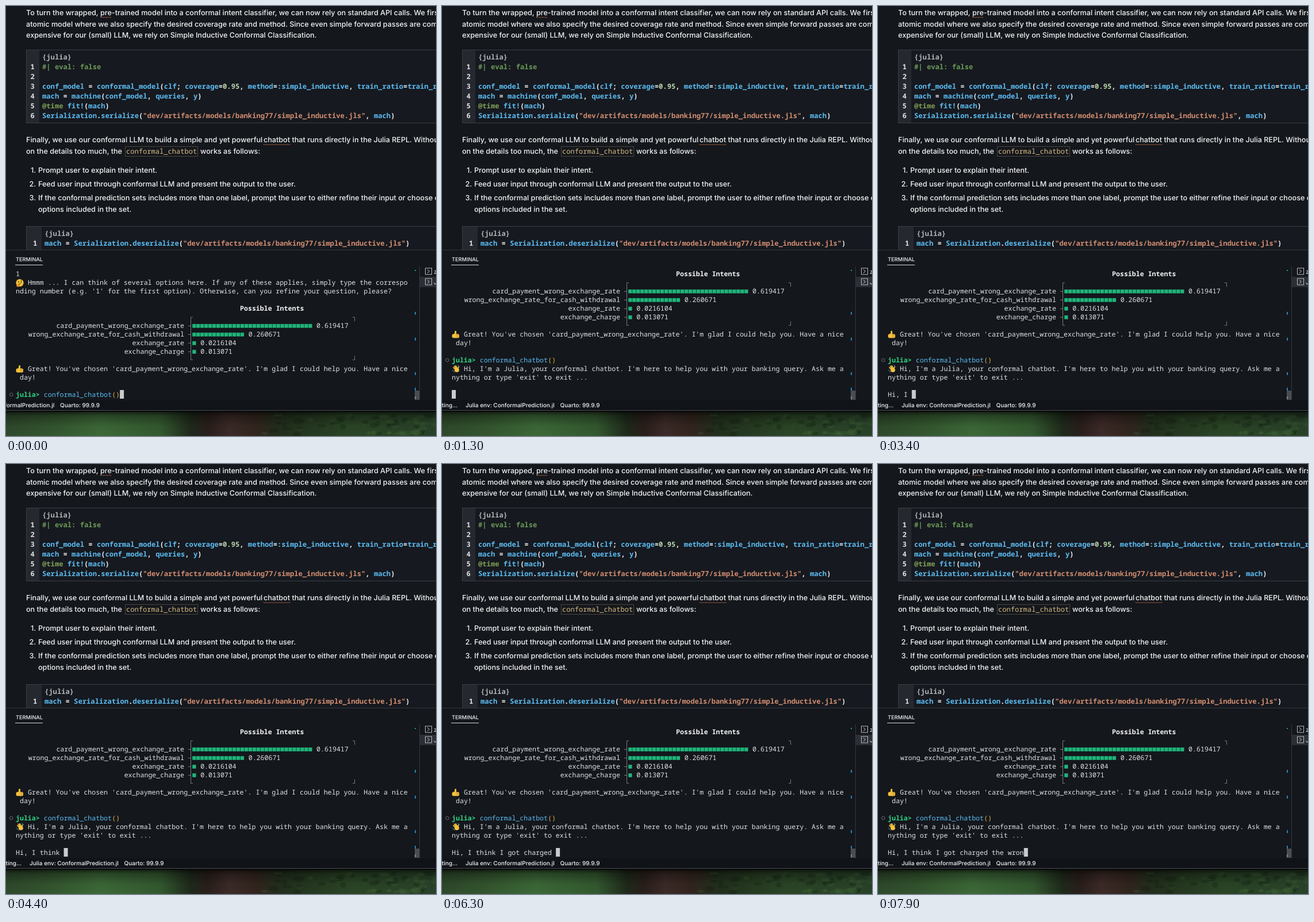
An HTML page with a canvas for the animation above (8 s loop, 748 px wide and 748 px high).

```html
<!DOCTYPE html>
<html lang="en">
<head>
<meta charset="utf-8">
<title>Conformal chatbot</title>
<style>
html, body { margin: 0; width: 100%; height: 100%; overflow: hidden; background: #14171c; }
canvas { display: block; width: 100vw; height: 100vh; }
</style>
</head>
<body>
<canvas id="stage" width="748" height="748"></canvas>
<script>
const ctx = document.getElementById('stage').getContext('2d');
ctx.textRendering = 'geometricPrecision';

const LOOP = 8000, CELL = 6.965, LEFT = 17;
const SANS = 'Inter, sans-serif', MONO = '"Noto Sans Mono", "DejaVu Sans Mono", monospace';
const PROSE = `500 12.6px ${SANS}`, CODE = `600 12.18px ${MONO}`, SMALL = `500 10px ${SANS}`;
const TERM = `500 11.6px ${MONO}`, BOLD = `bold 11.6px ${MONO}`;
const WHITE = '#f3f4f5', BLUE = '#5bbcf2', STRING = '#d28d70', NUMBER = '#b9d3a9',
      COMMENT = '#6a9a58', GRAY = '#b0b2b6', GREEN = '#1fb57a', GOLD = '#e3b341', SOFT = '#e0e2e4';

function rect(x, y, w, h, color) {
  ctx.fillStyle = color;
  ctx.fillRect(x, y, w, h);
}

// y is the middle of the line of text
function text(str, x, y, font, color, align = 'left') {
  ctx.font = font;
  ctx.fillStyle = color;
  ctx.textAlign = align;
  ctx.fillText(str, x, y + 4.2);
}

// parts: text, colour, text, colour, ...
function code(x, y, ...parts) {
  for (let i = 0; i < parts.length; i += 2) {
    text(parts[i], x, y, CODE, parts[i + 1]);
    x += ctx.measureText(parts[i]).width;
  }
}

function stroke(path, color, width = 1) {
  ctx.strokeStyle = color;
  ctx.lineWidth = width;
  ctx.stroke(new Path2D(path));
}

function prose(str, x, y) { text(str, x, y, PROSE, WHITE); }

function dots(x, end, y) {
  for (; x < end; x += 2.5) rect(x, y, 1.3, 1.3, '#c9704f');
}

function codeBox(top, height, gutter) {
  rect(35, top, 720, height, '#16191f');
  rect(35, top, gutter, height, '#25282f');
  ctx.strokeStyle = '#3b3e44';
  ctx.lineWidth = 1;
  ctx.strokeRect(35.5, top + .5, 720, height - 1);
}

function editor() {
  prose('To turn the wrapped,', 35, 11.5);
  prose('pre-trained model into a conformal intent classifier, we can now rely on standard API calls. We first wrap', 164, 11.5);
  dots(164, 182, 19);
  prose('atomic model where we also specify the desired coverage rate and method. Since even simple forward passes are computationally', 35, 31.5);
  prose('expensive for our (small) LLM, we rely on Simple Inductive Conformal Classification.', 35, 51);

  codeBox(76, 128, 23);
  const row = i => 105.5 + 17.1 * (i - 1);
  text('{julia}', 63, 89, CODE, GRAY);
  for (let i = 1; i <= 6; i++) text(i, 42.5, row(i), CODE, SOFT);
  code(63, row(1), '#| eval: false', COMMENT);
  code(63, row(3), 'conf_model', BLUE, ' = ', WHITE, 'conformal_model', BLUE, '(', WHITE, 'clf', BLUE, '; ', WHITE,
    'coverage', BLUE, '=', WHITE, '0.95', NUMBER, ', ', WHITE, 'method', BLUE, '=', WHITE, ':simple_inductive', BLUE,
    ', ', WHITE, 'train_ratio', BLUE, '=', WHITE, 'train_ratio', BLUE, ')', WHITE);
  code(63, row(4), 'mach', BLUE, ' = ', WHITE, 'machine', BLUE, '(', WHITE, 'conf_model', BLUE, ', ', WHITE,
    'queries', BLUE, ', ', WHITE, 'y', BLUE, ')', WHITE);
  code(63, row(5), '@time', '#7f9f55', ' ', WHITE, 'fit!', BLUE, '(', WHITE, 'mach', BLUE, ')', WHITE);
  const file = '"dev/artifacts/models/banking77/simple_inductive.jls"';
  code(63, row(6), 'Serialization', BLUE, '.', WHITE, 'serialize', BLUE, '(', WHITE, file, STRING, ', ', WHITE,
    'mach', BLUE, ')', WHITE);

  prose('Finally, we use our conformal LLM to build a simple and yet powerful', 35, 232.5);
  prose('chatbot', 448, 232.5);
  dots(448, 494, 240.5);
  prose('that runs directly in the Julia REPL. Without going', 497.5, 232.5);
  prose('on the details too much, the', 35, 253);
  ctx.strokeStyle = '#4a463d';
  ctx.lineWidth = 1;
  ctx.strokeRect(207.5, 244.5, 126, 17);
  text('conformal_chatbot', 209, 253, `500 12.1px ${MONO}`, '#d9bd84');
  prose('works as follows:', 338, 253);

  ['Prompt user to explain their intent.',
   'Feed user input through conformal LLM and present the output to the user.',
   'If the conformal prediction sets includes more than one label, prompt the user to either refine their input or choose one of'
  ].forEach((item, i) => {
    const y = 285.5 + 24 * i;
    text(`${i + 1}.`, 52, y, PROSE, WHITE, 'right');
    prose(item, 56, y);
  });
  prose('options included in the set.', 56, 353.5);

  codeBox(383, 60, 27);
  text('{julia}', 67, 395.5, CODE, GRAY);
  text('1', 47, 412.5, CODE, SOFT);
  code(67, 412.5, 'mach', BLUE, ' = ', WHITE, 'Serialization', BLUE, '.', WHITE, 'deserialize', BLUE, '(', WHITE,
    file, STRING, ')', WHITE);
}

const SKIN = '#f4c03c', SHADE = '#a8701c', DARK = '#4e3510';

function disc(x, y, rx, ry, color) {
  ctx.fillStyle = color;
  ctx.beginPath();
  ctx.ellipse(x, y, rx, ry, 0, 0, 7);
  ctx.fill();
}

function thinker(x, y) {
  disc(x, y, 6.6, 6.6, SKIN);
  disc(x - 2, y - 1.5, .9, 1.2, DARK);
  disc(x + 2.6, y - 1.5, .9, 1.2, DARK);
  stroke(`M${x - 2} ${y + 2.3}l4-.8M${x + 1} ${y - 4.4}l3-.3`, DARK);
  disc(x - 3, y + 5, 2.8, 2, '#e08f25');
  stroke(`M${x - 4} ${y + 4.5}l4-1.5`, '#e08f25', 1.5);
}

function thumb(x, y) {
  ctx.lineCap = 'round';
  stroke(`M${x - 2} ${y + 1}q2-2 1.5-5.5`, SKIN, 3);
  ctx.fillStyle = SKIN;
  ctx.beginPath();
  ctx.roundRect(x - 6.5, y - .5, 12.5, 7, 2.5);
  ctx.fill();
  stroke(`M${x + 1} ${y + 1.6}h4M${x + 1} ${y + 3.8}h4`, SHADE, .6);
  ctx.lineCap = 'butt';
}

function wave(x, y) {
  ctx.lineCap = 'round';
  stroke(`M${x} ${y + 2}l-4.5-4M${x + 1} ${y + 1}l-4-5.5M${x + 2} ${y}l-2.5-5M${x + 2.5} ${y + 2}l1.5-5`, SKIN, 2);
  disc(x + 1.3, y + 2.2, 4, 3.8, SKIN);
  stroke(`M${x - 6} ${y + 2}q1 3 3.5 4M${x + 3} ${y - 6}q2.5 .5 3 3`, '#55a8d8', .9);
  ctx.lineCap = 'butt';
}

function chart(y) {
  text('Possible Intents', LEFT + 56 * CELL, y, BOLD, WHITE);
  const top = y + 15.5, end = y + 89.5;
  stroke(`M325 ${top}H321.5V${end}H325M603 ${top}H606.5v7M606.5 ${end - 7}v7H603`, '#777b80');
  [['card_payment_wrong_exchange_rate', 30, '0.619417'],
   ['wrong_exchange_rate_for_cash_withdrawal', 13, '0.260671'],
   ['exchange_rate', 1, '0.0216104'],
   ['exchange_charge', 1, '0.013071']].forEach(([label, cells, value], i) => {
    const mid = y + 30 + 15 * i;
    text(label, 310, mid, TERM, SOFT, 'right');
    stroke(`M317 ${mid + .5}h4`, '#777b80');
    for (let c = 0; c < cells; c++) rect(324.2 + c * CELL, mid - 2.8, 6.3, 6.6, GREEN);
    text(value, 324.2 + (cells + 1) * CELL, mid, TERM, SOFT);
  });
}

const say = (str, y, col = 0) => text(str, LEFT + col * CELL, y, TERM, SOFT);
const caret = col => rect(LEFT + col * CELL, 668, 7, 15, '#c9cbce');

const MESSAGE = 'Hi, I think I got charged the wron';
// moment of each keystroke, in tenths of a second
const KEYS = [23, 24, 27, 28, 31, 32, 36, 37, 39, 40, 42, 44, 46, 48, 49, 50, 52, 54, 55, 56, 57, 58, 59, 60, 61, 62,
  65, 66, 67, 69, 71, 73, 74, 76];

function terminal(t) {
  rect(0, 424, 748, 262, '#14171c');
  rect(0, 424, 748, 1, '#34373d');
  text('TERMINAL', LEFT, 439.5, `500 9.2px ${SANS}`, WHITE);
  rect(LEFT - 1, 450, 48, 1, '#d5d7d9');

  const started = t >= 100, shift = started ? -60 : 0;
  ctx.save();
  ctx.beginPath();
  ctx.rect(0, 455, 711, 231);
  ctx.clip();
  if (!started) {
    say('1', 466);
    thinker(24, 481.5);
    say('Hmmm ... I can think of several options here. If any of these applies, simply type the correspo', 481, 3);
    say("nding number (e.g. '1' for the first option). Otherwise, can you refine your question, please?", 496);
  }
  chart(526 + shift);
  thumb(24, 631 + shift);
  say("Great! You've chosen 'card_payment_wrong_exchange_rate'. I'm glad I could help you. Have a nice", 631 + shift, 3);
  say('day!', 646 + shift, 1);

  const prompt = 676 + shift;
  ctx.strokeStyle = '#65696f';
  ctx.lineWidth = 1;
  ctx.beginPath();
  ctx.arc(9.2, prompt, 2.8, 0, 7);
  ctx.stroke();
  text('julia>', LEFT, prompt, BOLD, '#2fd584');
  text('conformal_chatbot', LEFT + 7 * CELL, prompt, TERM, BLUE);
  text('()', LEFT + 24 * CELL, prompt, TERM, GOLD);
  if (started) {
    wave(24.5, 631);
    say("Hi, I'm a Julia, your conformal chatbot. I'm here to help you with your banking query. Ask me a", 631, 3);
    say("nything or type 'exit' to exit ...", 646);
    const typed = KEYS.filter(k => t >= k * 100).length;
    say(MESSAGE.slice(0, typed), 676);
    caret(typed);
  } else caret(26);
  ctx.restore();

  // scrollbar marks and list of shells
  rect(711, 669, 8, 16, '#4a4d52');
  rect(711, 459, 2, 2, '#2a9d7c');
  for (const y of [532, 577, 637, 664]) rect(711, y, 2, 5, '#2382b8');
  rect(711, 679, 2, 5, '#7b8288');
  rect(719, 453, 1, 233, '#34373d');
  rect(720, 471, 28, 18, '#2c2f36');
  ['zsh', 'Julia'].forEach((name, i) => {
    const y = 461.5 + 18 * i;
    ctx.strokeStyle = '#b9bcc0';
    ctx.lineWidth = 1;
    ctx.strokeRect(729.5, y - 5.5, 11, 11);
    stroke(`M733 ${y - 3}l3.5 3l-3.5 3`, '#c9cbce');
    text(name, 744, y, `10.5px ${SANS}`, SOFT);
  });
}

function statusBar(t) {
  rect(0, 686, 748, 18, '#101318');
  const busy = t >= 500, x = busy ? 0 : -111.5;
  if (busy) text('Updating...', 27, 694, SMALL, WHITE, 'right');
  text('Julia env: ConformalPrediction.jl', 41 + x, 694, SMALL, WHITE);
  text('Quarto: 99.9.9', 205.5 + x, 694, SMALL, WHITE);
}

function fill(x0, y0, x1, y1, stops) {
  const g = ctx.createLinearGradient(x0, y0, x1, y1);
  stops.forEach(([at, color]) => g.addColorStop(at, color));
  rect(0, 703, 748, 45, g);
}

function backdrop() {
  fill(0, 0, 748, 0, [[0, '#2f4a2c'], [.1, '#34562f'], [.22, '#3d6a38'], [.36, '#345a30'], [.43, '#1f2a1b'],
    [.47, '#2a1f1b'], [.52, '#3d2b28'], [.58, '#33251f'], [.64, '#22301d'], [.8, '#2b4626'], [1, '#29432a']]);
  // blurred leaves on the right
  let seed = 7;
  const random = () => (seed = seed * 16807 % 2147483647) / 2147483647;
  for (let i = 0; i < 60; i++)
    disc(450 + 298 * random(), 712 + 34 * random(), 4 + 6 * random(), 2 + 3 * random(), i % 2 ? '#0d170c40' : '#4f784030');
  fill(0, 704, 0, 748, [[0, '#000b'], [.2, '#0005'], [.6, '#0001'], [1, '#0000']]);
  rect(0, 703, 748, 1, '#4a4d50');
  rect(0, 704, 748, 2, '#08090a');
}

function frame(now) {
  const t = now % LOOP;
  rect(0, 0, 748, 748, '#14171c');
  editor();
  terminal(t);
  statusBar(t);
  backdrop();
  requestAnimationFrame(frame);
}
requestAnimationFrame(frame);
</script>
</body>
</html>
```
